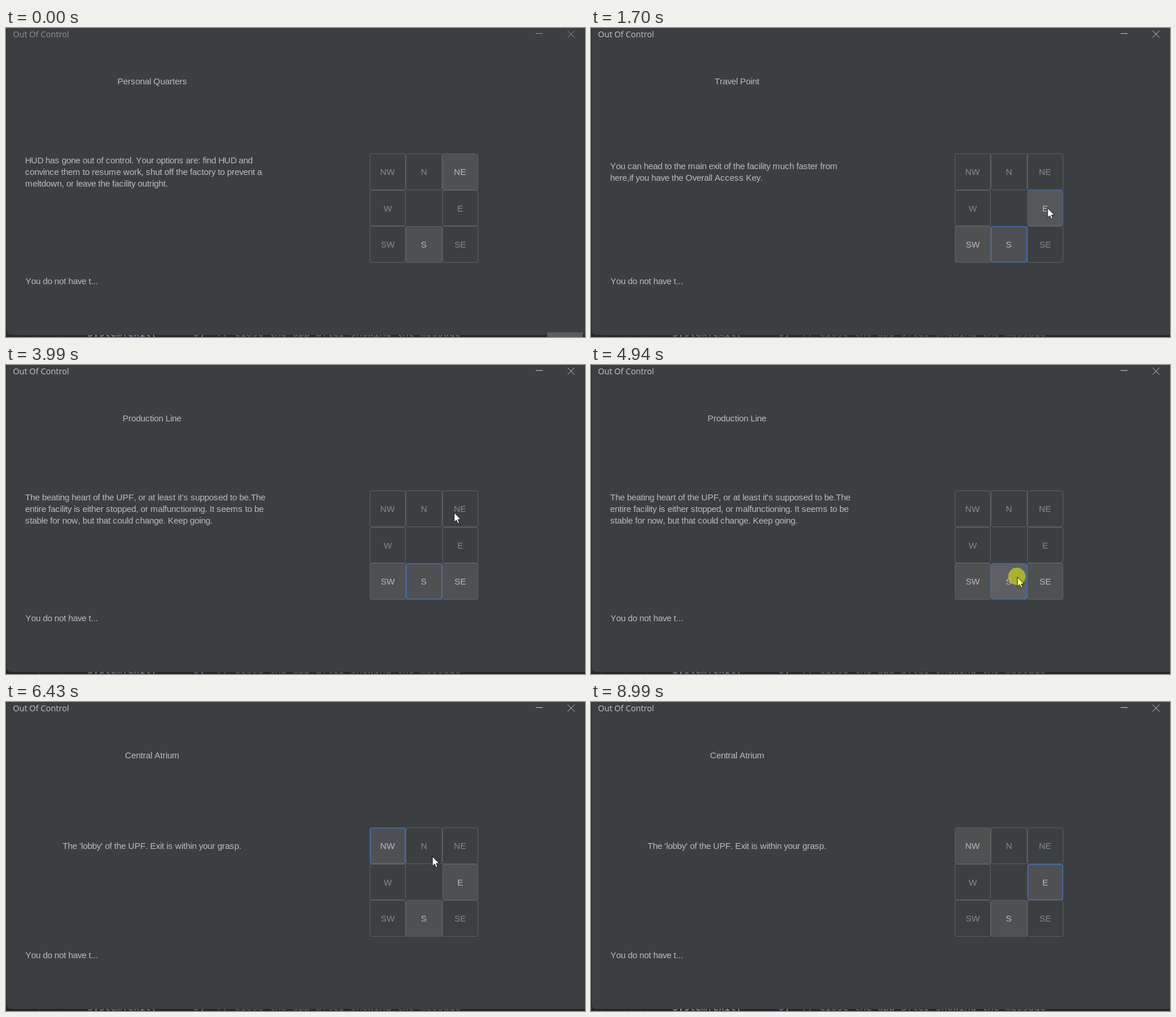
An HTML page for the animation above (9.08 s loop, 998 by 532 pixels).

```html
<!DOCTYPE html>
<html lang="en">
<head>
<meta charset="utf-8">
<title>Out Of Control</title>
<style>
  html, body { margin: 0; width: 100%; height: 100%; overflow: hidden; background: #242628; }
  svg { display: block; width: 998px; height: 532px; }
  .ui { font: 15px "Liberation Sans", Arial, sans-serif; fill: #bbb; }
  .caption { font: 14.15px "Open Sans", "Noto Sans", sans-serif; }
  .code { font: 16.67px "Noto Sans Mono", "DejaVu Sans Mono", monospace; white-space: pre; }
</style>
</head>
<body>
<svg id="stage" viewBox="0 0 998 532" xmlns="http://www.w3.org/2000/svg"></svg>
<script>
const LOOP = 9080;
const stage = document.getElementById("stage");

function add(tag, attrs, text) {
  const el = document.createElementNS("http://www.w3.org/2000/svg", tag);
  set(el, attrs);
  if (text) el.textContent = text;
  stage.appendChild(el);
  return el;
}
function set(el, attrs) {
  for (const k in attrs) el.setAttribute(k, attrs[k]);
}

// Text on whole-pixel advances, as in a hinted desktop toolkit.
const pen = document.createElement("canvas").getContext("2d");
pen.font = '15px "Liberation Sans", Arial, sans-serif';
const hinted = { v: 7, x: 7, y: 7, k: 7, z: 7, m: 13, H: 10, D: 10 };
const advance = c => hinted[c] || Math.round(pen.measureText(c).width);
const widthOf = s => [...s].reduce((w, c) => w + advance(c), 0);
function write(el, x, y, s) {
  const xs = [];
  for (const c of s) {
    xs.push(x);
    x += advance(c);
  }
  el.textContent = s;
  set(el, { x: xs.join(" "), y });
}
const writeCentred = (el, cx, y, s) => write(el, Math.floor(cx - widthOf(s) / 2), y, s);
const label = () => add("text", { class: "ui" });

const rooms = [
  { from: 0, name: "Personal Quarters", exits: "NE S", focus: "", x: 33, lines: [
    "HUD has gone out of control. Your options are: find HUD and",
    "convince them to resume work, shut off the factory to prevent a",
    "meltdown, or leave the facility outright."] },
  { from: 1250, name: "Travel Point", exits: "SW S E", focus: "S", x: 33, lines: [
    "You can head to the main exit of the facility much faster from",
    "here,if you have the Overall Access Key."] },
  { from: 3270, name: "Production Line", exits: "SW S SE", focus: "S", x: 33, lines: [
    "The beating heart of the UPF, or at least it's supposed to be.The",
    "entire facility is either stopped, or malfunctioning. It seems to be",
    "stable for now, but that could change. Keep going."] },
  { from: 5420, name: "Shipping Area", exits: "NW N", focus: "N", x: 33, lines: [
    "This area handles all the materials coming in and goods coming",
    "out.There are several automated vehicles currently driving in",
    "random directions like bumper cars on the ground floor."] },
  { from: 6430, name: "Central Atrium", exits: "NW E S", focus: "NW", x: 97.5, lines: [
    "The 'lobby' of the UPF. Exit is within your grasp."] }
];

// Mouse presses: start, end, button
const presses = [
  [1000, 1250, "NE"], [1850, 2250, "E"], [2990, 3270, "S"], [4860, 5140, "S"],
  [6240, 6430, "N"], [7050, 7320, "E"], [7450, 7700, "E"]
];

// Pointer moves: start, end, x, y of the arrival
const entry = [925, 532];
const moves = [
  [70, 930, 785, 253], [1580, 1700, 787, 310], [1760, 1850, 790, 311],
  [2510, 2960, 726, 376], [3330, 4070, 774, 250], [4190, 4520, 662, 372],
  [4520, 4840, 735, 365], [5440, 5760, 797, 377], [5950, 6220, 735, 266],
  [6700, 6910, 790, 311], [8190, 8600, 920, 536]
];

function pointerAt(t) {
  let [x, y] = entry;
  for (const [a, b, tx, ty] of moves) {
    if (t < a) break;
    const u = Math.min(1, (t - a) / (b - a));
    const e = u * u * (3 - 2 * u);
    x += (tx - x) * e;
    y += (ty - y) * e;
  }
  return [x, y];
}

// Editor behind the window
add("rect", { width: 998, height: 532, fill: "#242628" });
for (const x of [17.5, 57.5, 97.5]) {
  add("path", { d: `M${x} 528V532`, stroke: "#3a3d3f" });
}
const code = [
  [140, "#a9b7c6", "System.exit("], [323, "#6897bb", "0"], [333, "#a9b7c6", ")"],
  [364, "#808080", "// Close the app after showing the message"]
].map(([x, fill, s]) => add("text", { class: "code", x, y: 530.5, fill }, s));

// Window
add("path", { d: "M1 0H998V528.5H10Q1 528.5 1 520Z", fill: "#3c3f41" });
add("path", { d: "M.5 0V520", stroke: "#202123" });
const bar = add("rect", { x: 933, y: 524, width: 61, height: 8, fill: "#5a5c5e" });
const caption = add("text", { class: "caption", x: 12, y: 16 }, "Out Of Control");
const icons = add("path", { d: "M913 9.5H925M968 4.5L980 16.5M980 4.5L968 16.5", fill: "none" });

const heading = label();
const body = [label(), label(), label()];
write(label(), 33.5, 441, "You do not have t...");

// Compass
const cols = [627, 689, 752, 814], rows = [216, 279, 341, 404];
const buttons = [];
["NW N NE", "W - E", "SW S SE"].forEach((row, r) => row.split(" ").forEach((id, c) => {
  if (id === "-") return;
  const x = cols[c], y = rows[r], w = cols[c + 1] - x, h = rows[r + 1] - y;
  const box = add("rect", { rx: 2.5 });
  const text = label();
  writeCentred(text, x + w / 2, [253, 316, 378][r], id);
  buttons.push({ id, x, y, w, h, box, text });
}));

const halo = add("circle", { r: 15, fill: "#ff0", "fill-opacity": .5 });
const arrow = add("path", { d: "M0 0V16.5L3.8 13L6.3 18.7L9 17.5L6.6 12H11.7Z", stroke: "#111", "stroke-linejoin": "round" });

function focusAt(t, room) {
  let id = room.focus;
  for (const [a, , target] of presses) {
    if (a >= room.from && a <= t) id = target;
  }
  return id;
}

let shown;
function showRoom(room) {
  if (room === shown) return;
  shown = room;
  writeCentred(heading, 252, 97, room.name);
  const top = 253 - 10 * (room.lines.length - 1);
  body.forEach((el, i) => write(el, room.x, top + 20 * i, room.lines[i] || ""));
}

function draw(t) {
  const room = rooms.filter(r => r.from <= t).pop();
  showRoom(room);

  const active = t >= 1000;
  set(caption, { fill: active ? "#c4c4c4" : "#929496" });
  set(icons, { stroke: active ? "#c8c8c8" : "#999b9c" });
  set(bar, { visibility: t < 200 ? "visible" : "hidden" });
  const dim = active && t < 8990;
  code.forEach(el => set(el, { opacity: dim ? .75 : 1 }));

  const [px, py] = pointerAt(t);
  const present = t >= 70 && t < 8600;
  const pressed = presses.some(([a, b]) => t >= a && t < b);
  const focus = focusAt(t, room);
  const exits = room.exits.split(" ");

  for (const { id, x, y, w, h, box, text } of buttons) {
    const on = exits.includes(id);
    const hover = on && present && px >= x && px < x + w && py >= y && py < y + h;
    const focused = on && focus === id;
    const line = focused ? 2 : 1; // kept inside the button's bounds
    set(box, {
      x: x + line / 2, y: y + line / 2, width: w - line, height: h - line,
      fill: !on ? "#3c3f41" : !hover ? "#4e5052" : pressed ? "#5d5f62" : "#55585a",
      stroke: hover || focused ? "#40699c" : "#5e6060",
      "stroke-width": line
    });
    text.style.fill = on ? "#bbb" : "#888";
  }

  set(halo, { cx: px - 1, cy: py - 1, visibility: pressed ? "visible" : "hidden" });
  set(arrow, {
    transform: `translate(${px} ${py})`,
    fill: pressed ? "#ffff8c" : "#fff",
    visibility: present ? "visible" : "hidden"
  });
}

const start = performance.now();
function tick() {
  draw((performance.now() - start) % LOOP);
  requestAnimationFrame(tick);
}
tick();
</script>
</body>
</html>
```
